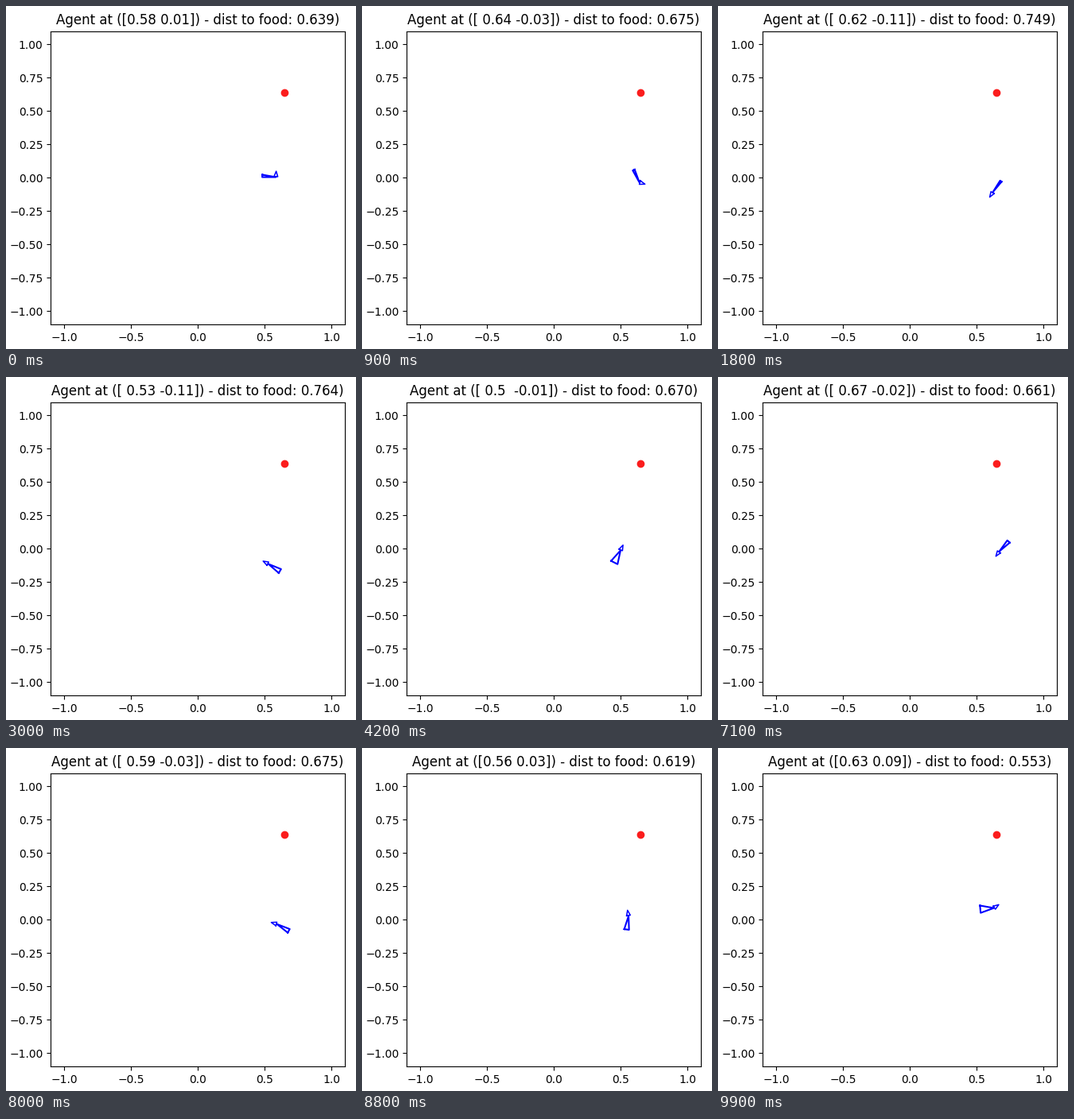
A matplotlib script that plays this animation: 440x432 px, repeating every 10000 ms.

```python
import numpy as np
import matplotlib.pyplot as plt
from matplotlib.animation import FuncAnimation

W, H, DPI = 440, 432, 100
SIDE = 369.6
FRAMES, INTERVAL = 100, 100
SPEED = 0.0105
FOOD = np.array([0.65, 0.641])

# time, x, y, heading (deg), tail width, head turn (deg)
KEYS = np.array([
    [0, 0.585, 0.0053, -5, 0.018, 92],
    [18, 0.622, -0.1075, -126, 0.014, 4],
    [42, 0.500, -0.0120, -297, 0.054, 2],
    [56, 0.613, 0.0602, -365, 0.055, 8],
    [71, 0.670, -0.0197, -493, 0.025, 8],
    [88, 0.560, 0.0286, -638, 0.036, 18],
    [99, 0.630, 0.0884, -715, 0.055, 30],
])
T, XY = KEYS[:, 0], KEYS[:, 1:3]

BODY = np.array([[-0.102, 0.5], [-0.102, -0.5], [0, 0], [-0.102, 0.5]])
HEAD = np.array([[0.004, 0.014], [0.004, -0.014], [0.044, 0], [0.004, 0.014]])


def unit(deg):
    a = np.radians(deg)
    return np.array([np.cos(a), np.sin(a)])


def place(shape, pos, deg):
    c, s = unit(deg)
    return pos + shape @ np.array([[c, s], [-s, c]])


def position(t):
    """Cubic Hermite path that leaves each key along its heading."""
    k = min(np.searchsorted(T, t, side="right") - 1, len(T) - 2)
    span = T[k + 1] - T[k]
    u = (t - T[k]) / span
    m0, m1 = (SPEED * span * unit(d) for d in KEYS[k:k + 2, 3])
    return ((1 + 2 * u) * (1 - u) ** 2 * XY[k] + u * (1 - u) ** 2 * m0
            + u * u * (3 - 2 * u) * XY[k + 1] + u * u * (u - 1) * m1)


fig = plt.figure(figsize=(W / DPI, H / DPI), dpi=DPI, facecolor="white")
ax = fig.add_axes([56.2 / W, 30.8 / H, SIDE / W, SIDE / H])
ax.set_xlim(-1.1, 1.1)
ax.set_ylim(-1.1, 1.1)
ax.set_xticks(np.arange(-1, 1.1, 0.5))
ax.set_yticks(np.arange(-1, 1.1, 0.25))
ax.scatter(*FOOD, s=36, color="#fb1d1d")
body, = ax.plot([], [], color="b", lw=1.5)
head, = ax.plot([], [], color="b", lw=1.1)
title = ax.set_title("")


def update(i):
    pos = position(i)
    heading, width, turn = (np.interp(i, T, KEYS[:, c]) for c in (3, 4, 5))
    body.set_data(*place(BODY * [1, width], pos, heading).T)
    head.set_data(*place(HEAD, pos, heading + turn).T)
    dist = np.hypot(*(FOOD - pos))
    title.set_text(f"Agent at ({np.round(pos, 2)}) - dist to food: {dist:.3f})")
    return body, head, title


anim = FuncAnimation(fig, update, frames=FRAMES, interval=INTERVAL,
                     repeat=True, repeat_delay=0, blit=False)
plt.show()
```
